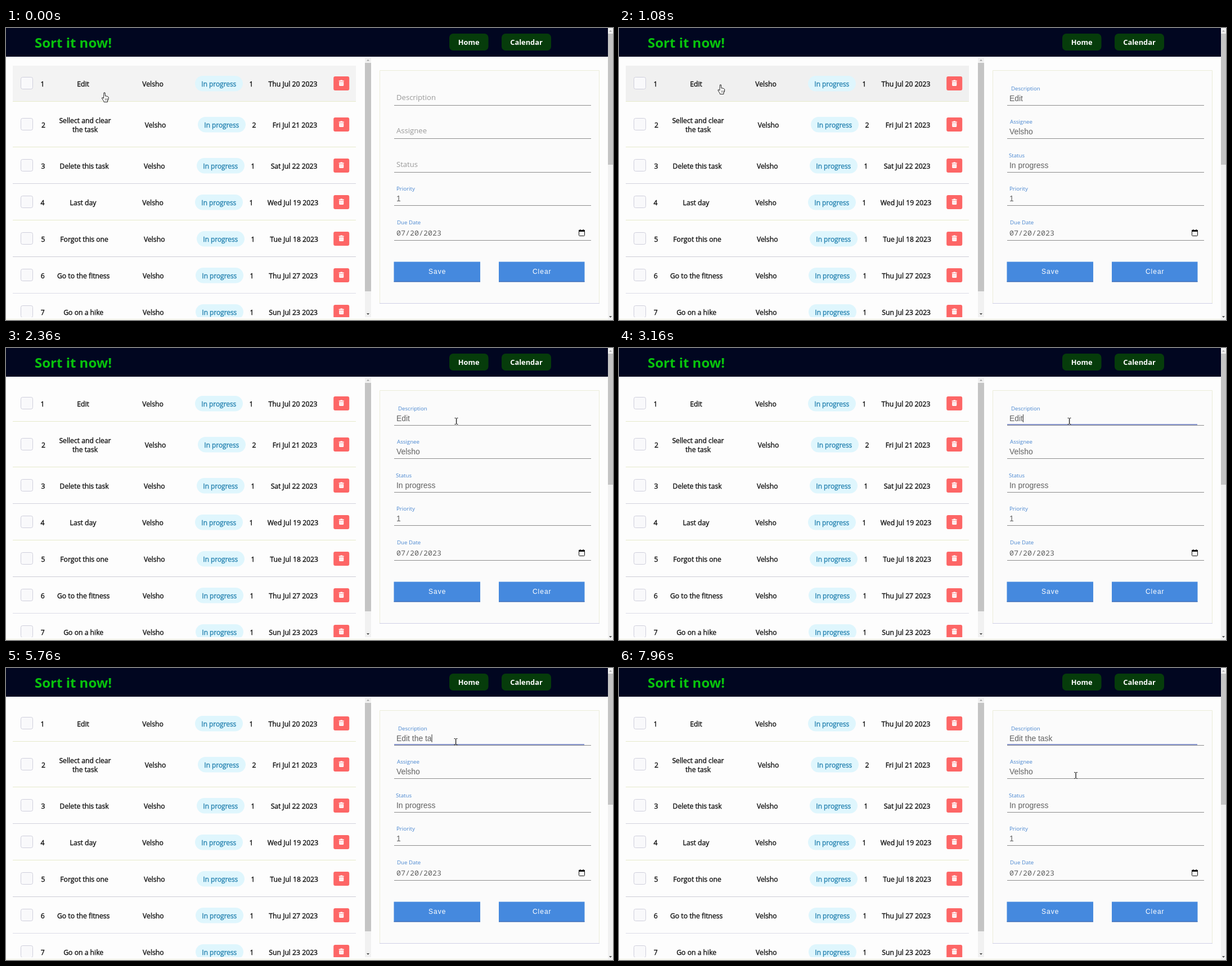
Animation of 1079 by 519 pixels, one loop 8000 ms. Source, as an HTML page with a canvas:

```html
<!DOCTYPE html>
<html lang="en">
<head>
<meta charset="utf-8">
<title>Task list</title>
<style>
html, body { margin: 0; width: 100%; height: 100%; overflow: hidden; background: #fdfdfd; }
canvas { display: block; }
</style>
</head>
<body>
<canvas id="stage" width="1079" height="519"></canvas>
<script>
const ctx = document.getElementById('stage').getContext('2d');
const LOOP = 8000, STEP = 40;
const UI = '"Open Sans", "Noto Sans", sans-serif';
const ARIAL = '"Liberation Sans", Arial, sans-serif';
const MONO = '"Noto Sans Mono", "DejaVu Sans Mono", monospace';

// centre y, column shift, description lines, priority, due date
const rows = [
  [99, 0, ['Edit'], 1, 'Thu Jul 20 2023'],
  [172, 5, ['Sellect and clear', 'the task'], 2, 'Fri Jul 21 2023'],
  [245, 3, ['Delete this task'], 1, 'Sat Jul 22 2023'],
  [310, 0, ['Last day'], 1, 'Wed Jul 19 2023'],
  [375, 3, ['Forgot this one'], 1, 'Tue Jul 18 2023'],
  [440, 1, ['Go to the fitness'], 1, 'Thu Jul 27 2023'],
  [505, 1, ['Go on a hike'], 1, 'Sun Jul 23 2023']
];
const rules = [[130, '#e6eacb'], [211, '#e6eacb'], [276, '#d2d2dc'], [341, '#e6eacb'], [406, '#cdcdd6'], [471, '#dcdce8']];

// label, label x, underline y, value
const fields = [
  ['Description', 697, 137, 'Edit'],
  ['Assignee', 695, 196, 'Velsho'],
  ['Status', 693, 256, 'In progress'],
  ['Priority', 694, 315, '1'],
  ['Due Date', 695, 377, '07/20/2023']
];

const FILL = 640, FOCUS = 2700;
const keys = [[4560, ' '], [4720, 't'], [4960, 'h'], [5120, 'e'], [5320, ' '], [5480, 't'], [5680, 'a'], [5920, 's'], [6100, 'k']];
const path = [
  [0, 175, 115], [480, 176, 108], [1000, 180.5, 101], [1240, 180.5, 101], [1640, 600, 112], [1840, 810.5, 188],
  [2320, 800.5, 130], [4000, 800.5, 130], [4400, 799.5, 131], [7520, 799.5, 131], [7960, 812, 191], [8000, 812, 192]
];

const ramp = (t, from, length) => Math.max(0, Math.min(1, (t - from) / length));
const mix = (a, b, k) => a + (b - a) * k;

function rect(x, y, w, h, fill, radius = 0, stroke) {
  ctx.beginPath();
  ctx.roundRect(x, y, w, h, radius);
  ctx.fillStyle = fill;
  ctx.fill();
  if (stroke) {
    ctx.strokeStyle = stroke;
    ctx.lineWidth = 1;
    ctx.stroke();
  }
}

// y is the middle of the capitals; heavy thickens the strokes a little
function text(s, x, y, size, color, { align = 'left', weight = 400, family = UI, spacing = 0, heavy = 0 } = {}) {
  ctx.font = `${weight} ${size}px ${family}`;
  ctx.letterSpacing = spacing + 'px';
  ctx.textAlign = align;
  ctx.fillStyle = ctx.strokeStyle = color;
  ctx.fillText(s, x, y + size * 0.36);
  if (heavy) {
    ctx.lineWidth = heavy;
    ctx.strokeText(s, x, y + size * 0.36);
  }
}

function shape(points, fill, stroke) {
  ctx.beginPath();
  points.forEach(([x, y]) => ctx.lineTo(x, y));
  ctx.closePath();
  ctx.fillStyle = fill;
  ctx.fill();
  if (stroke) {
    ctx.strokeStyle = stroke;
    ctx.lineWidth = 1;
    ctx.stroke();
  }
}

function scrollbar(x, top, w, bottom, thumbTop, thumbEnd) {
  rect(x, top, w, bottom - top, '#f1f1f1');
  rect(x, thumbTop, w, thumbEnd - thumbTop, '#c4c4c4');
  const c = x + w / 2;
  shape([[c - 2.5, top + 6.5], [c + 2.5, top + 6.5], [c, top + 4]], '#a0a0a0');
  shape([[c - 2.5, bottom - 7], [c + 2.5, bottom - 7], [c, bottom - 4]], '#505050');
}

function header() {
  rect(0, 0, 1070, 51, '#010620');
  text('Sort it now!', 51, 26, 24, '#08c40c', { weight: 700 });
  for (const [label, x, w] of [['Home', 788, 69.5], ['Calendar', 881, 88]]) {
    rect(x, 10, w, 30, '#063c0b', 7);
    text(label, x + w / 2, 25.5, 12.8, '#fff', { align: 'center', weight: 700 });
  }
}

function trash(x, y) {
  rect(x - 14, y - 12, 28, 25, '#fd6666', 3);
  rect(x - 4.5, y - 4.5, 9, 1.5, '#fff');
  rect(x - 1.8, y - 5.5, 3.6, 1.5, '#fff');
  rect(x - 4, y - 2.3, 8, 7.3, '#fff', [0, 0, 1.5, 1.5]);
  for (const dx of [-2, 0, 2]) rect(x + dx - 0.3, y - 1, 0.6, 4.5, '#ffb0b0');
}

function list(hover) {
  ctx.save();
  ctx.beginPath();
  ctx.rect(0, 51, 638, 463);
  ctx.clip();
  rect(12, 67, 610, 63, `rgba(240,240,240,${hover})`);
  for (const [y, color] of rules) rect(12, y, 610, 1, color);
  const mid = { align: 'center', heavy: 0.4 };
  rows.forEach(([y, d, lines, priority, date], n) => {
    rect(26.5, y - 11.5, 21, 21, '#f9f9fb', 3, '#cfcfdc');
    const cell = (s, x, dy = 0) => text(s, x, y + dy + 0.5, 12.2, '#161616', mid);
    cell(n + 1, 65 + d * 0.3);
    lines.forEach((s, i) => cell(s, 137 + d * 0.7, (i - (lines.length - 1) / 2) * 16.5));
    cell('Velsho', 261 + d * 0.9);
    rect(336 + d, y - 14, 85, 27.5, '#dff6fd', 14);
    text('In progress', 378.3 + d, y + 0.5, 11.9, '#2b86b2', mid);
    cell(priority, 436 + d);
    cell(date, 510 + d * 0.7);
    trash(596.2, y - 1);
  });
  ctx.restore();
}

function form(t) {
  rect(664.5, 75.5, 390, 414, '#fbfbfb', 0, '#ebecd9');
  rect(664, 489, 391, 1, '#d0d0e6');
  const fill = ramp(t, FILL, 200);
  const typed = keys.filter(k => k[0] <= t);
  fields.forEach(([label, x, y, value], i) => {
    const k = i < 3 ? fill : 1;
    rect(690, y, 350, 1, '#8c8c8c');
    const color = `rgb(${mix(153, 72, k)},${mix(153, 134, k)},${mix(153, 208, k)})`;
    const labelY = y - (i === 4 ? 31 : 29);
    text(label, mix(694, x, k), mix(y - 13.5, labelY, k), mix(13.1, 9.7, k), color);
    if (i < 3 && t < FILL) return;
    if (!i) value += typed.map(e => e[1]).join('');
    const date = i === 4;
    text(value, 694, y - (date ? 13 : 12), date ? 13.33 : 13.9, '#626262', { family: date ? MONO : ARIAL });
    if (i || t < FOCUS) return;
    const since = typed.length ? typed[typed.length - 1][0] : FOCUS;
    if ((t - since) % 1060 < 530) rect(694 + ctx.measureText(value).width, 118, 1, 14, '#333');
    rect(690, 135, 338 * ramp(t, FOCUS, 300), 2, '#8d9bd2');
  });

  // calendar icon
  rect(1018.5, 359.5, 10, 10, '#fbfbfb', 1, '#111');
  rect(1018, 359, 11, 3, '#111');
  rect(1020, 358, 1.5, 2, '#111');
  rect(1025.5, 358, 1.5, 2, '#111');

  for (const [label, x, w] of [['Save', 689.5, 153.5], ['Clear', 876, 152.5]]) {
    rect(x, 415.5, w, 35.5, '#4589de');
    rect(x, 450, w, 1.5, '#386bb8');
    text(label, x + w / 2 + 0.5, 433, 12, '#fff', { align: 'center', family: ARIAL, spacing: 1 });
  }
}

function pointerAt(t) {
  const i = path.findIndex(p => p[0] > t);
  const [a, b] = [path[i - 1], path[i]];
  const k = ramp(t, a[0], b[0] - a[0]), s = k * k * (3 - 2 * k);
  return [mix(a[1], b[1], s), mix(a[2], b[2], s)];
}

function pointer(x, y) {
  ctx.save();
  ctx.translate(x, y);
  if (x < 622) {
    ctx.lineJoin = 'round';
    shape([[-1, 0], [1, 0], [1.5, 6], [4, 6], [6, 7], [7.3, 8], [7, 12], [5.5, 14], [5.5, 16.5],
      [-1, 16.5], [-1.5, 14.5], [-4.5, 10], [-4, 8.5], [-1.5, 10]], '#fff', '#222');
    for (const dx of [1.2, 3.3, 5.3]) rect(dx, 10, 0.7, 4, '#444');
  } else if (x < 690) {
    shape([[0, 0], [0, 13], [3, 10.5], [5, 15], [7, 14], [5, 9.5], [9, 9.5]], '#fff', '#222');
  } else {
    rect(-0.6, -6, 1.4, 12, '#222');
    for (const dy of [-6, 5]) rect(-3, dy, 6, 1, '#222');
    rect(-0.6, -6, 1.2, 1, '#fdfdfd');
    rect(-0.6, 5, 1.2, 1, '#fdfdfd');
  }
  ctx.restore();
}

function draw(now) {
  const t = Math.floor((now % LOOP) / STEP) * STEP;
  rect(0, 0, 1079, 519, '#fdfdfd');
  header();
  list(t < 1640 ? 0.75 + 0.25 * ramp(t, 0, 160) : 1 - ramp(t, 1640, 300));
  form(t);
  rect(0, 517, 1070, 1, '#eeefdd');
  scrollbar(638, 52, 11, 514, 62, 468);
  scrollbar(1070, 0, 9, 519, 10, 243);
  pointer(...pointerAt(t));
  requestAnimationFrame(() => draw(performance.now() - start));
}

const start = performance.now();
draw(0);
</script>
</body>
</html>
```
